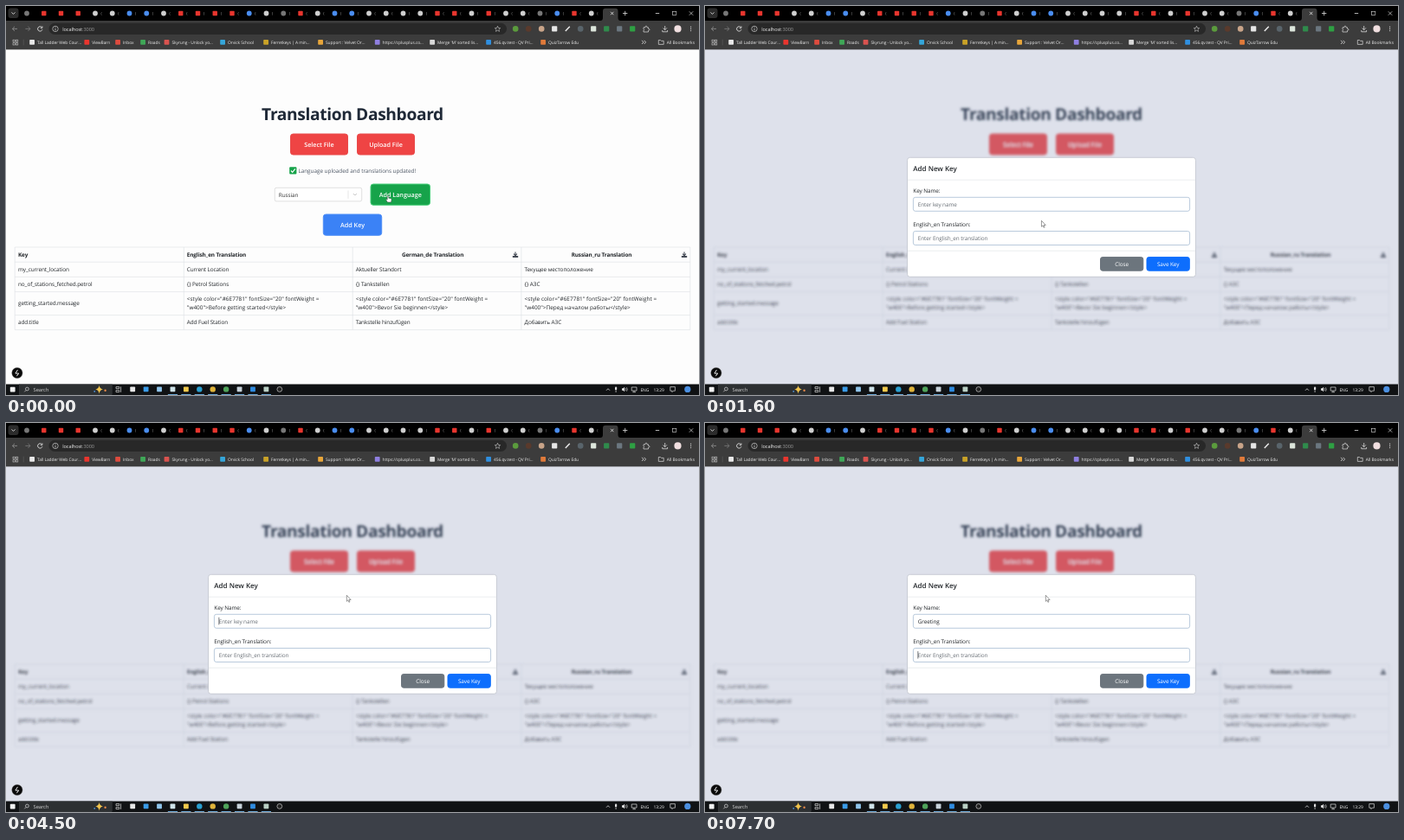
Animation of 800 by 450 pixels, one loop 8 s. Source, as an HTML page:

```html
<!DOCTYPE html>
<html lang="en">
<head>
<meta charset="utf-8">
<title>Translation Dashboard</title>
<style>
html, body { margin: 0; width: 100%; height: 100%; overflow: hidden; background: #fdfdfd; }
svg { display: block; width: 100vw; height: 100vh; }
text { font-family: "Open Sans", "Noto Sans", sans-serif; text-rendering: geometricPrecision; white-space: pre; }
</style>
</head>
<body>
<svg id="stage" viewBox="0 0 800 450">
  <defs>
    <filter id="soft" filterUnits="userSpaceOnUse" x="0" y="50" width="800" height="388">
      <feGaussianBlur id="blur" stdDeviation="0"/>
    </filter>
  </defs>
</svg>
<script>
const NS = 'http://www.w3.org/2000/svg';
const stage = document.getElementById('stage');
const blur = document.getElementById('blur');

function el(parent, tag, attrs = {}) {
  const node = document.createElementNS(NS, tag);
  for (const k in attrs) node.setAttribute(k, attrs[k]);
  return parent.appendChild(node);
}
const group = (parent = stage) => el(parent, 'g');
const rect = (p, x, y, width, height, fill, more) => el(p, 'rect', { x, y, width, height, fill, ...more });
const dot = (p, cx, cy, r, fill, more) => el(p, 'circle', { cx, cy, r, fill, ...more });
const line = (p, d, stroke, w = 0.7, more) =>
  el(p, 'path', { d, stroke, 'stroke-width': w, fill: 'none', ...more });
const tile = (p, cx, cy, size, fill) =>
  rect(p, cx - size / 2, cy - size / 2, size, size, fill, { rx: 0.8 });

// Sizes are nominal; the face is set a little smaller and tighter to suit the layout.
function text(p, x, y, str, o = {}) {
  const size = o.size || 6.67, weight = o.weight || 400;
  const track = o.track ?? ({ 400: -0.0125, 600: 0, 700: -0.018 })[weight];
  const node = el(p, 'text', {
    x, y, 'font-size': (size * 0.96).toFixed(2), 'font-weight': weight,
    'letter-spacing': (size * track).toFixed(3),
    fill: o.fill || '#212529', 'text-anchor': o.anchor || 'start'
  });
  node.textContent = str;
  return node;
}

function button(p, x, y, w, h, label, fill, o = {}) {
  const box = rect(p, x, y, w, h, fill, { rx: o.rx ?? 3, stroke: o.stroke || fill, 'stroke-width': 1 });
  text(p, x + w / 2, y + h / 2 + 2.7, label,
    { size: o.size || 7.5, weight: o.weight || 600, fill: '#fff', anchor: 'middle' });
  return box;
}

// Page
rect(stage, 0, 50, 800, 388, '#fdfdfd');
const page = group();
text(page, 400, 131.8, 'Translation Dashboard', { size: 20, weight: 700, fill: '#1f2937', anchor: 'middle' });
button(page, 328.5, 148, 66, 24, 'Select File', '#ef4444', { stroke: '#e94a4a' });
button(page, 405.5, 148, 66, 24, 'Upload File', '#ef4444', { stroke: '#e94a4a' });
rect(page, 327.2, 186.3, 8.2, 8.2, '#16a34a', { rx: 1 });
line(page, 'M329 190.5L330.7 192.3L333.8 188.4', '#fff', 1.1);
text(page, 337.4, 192.9, 'Language uploaded and translations updated!', { fill: '#4b5563', track: -0.005 });
rect(page, 310.3, 210.3, 100.4, 15.6, '#fff', { rx: 1.8, stroke: '#ccc', 'stroke-width': 0.6 });
text(page, 314.8, 220.6, 'Russian', { fill: '#333' });
line(page, 'M395 213.5V222.8', '#ccc', 0.5);
line(page, 'M400.8 217L402.8 219L404.8 217', '#bbb', 0.9);
const addLang = button(page, 421, 206, 68.5, 24.3, 'Add Language', '#22c55e', { stroke: '#45cf78' });
const addKey = button(page, 366.3, 241, 67.4, 24.3, 'Add Key', '#3b82f6', { stroke: '#4f8ff7' });

// Table
const rowLines = [279, 296.2, 313.4, 330.6, 357.6, 374.6];
const columns = [10.2, 205.3, 400.2, 594.9, 789.8];
for (const y of rowLines) line(page, `M10.2 ${y}H789.8`, '#dcdfe3', 0.6);
for (const x of columns) line(page, `M${x} 279V374.6`, '#dcdfe3', 0.6);

const head = { weight: 700 };
text(page, 14, 290.2, 'Key', head);
text(page, 208.8, 290.2, 'English_en Translation', head);
text(page, 492.6, 290.2, 'German_de Translation', { ...head, anchor: 'middle' });
text(page, 687.5, 290.2, 'Russian_ru Translation', { ...head, anchor: 'middle' });
for (const x of [588, 783]) {
  line(page, `M${x} 284.4V288M${x - 2} 286.7L${x} 288.8L${x + 2} 286.7`, '#444a55', 1.1);
  rect(page, x - 3.2, 289, 6.4, 2.1, '#444a55', { rx: 0.5 });
}
const cellText = [
  [307.1, 'my_current_location', 'Current Location', 'Aktueller Standort', 'Текущее местоположение'],
  [324.3, 'no_of_stations_fetched.petrol', '{} Petrol Stations', '{} Tankstellen', '{} АЗС'],
  [346.4, 'getting_started.message'],
  [368.4, 'add.title', 'Add Fuel Station', 'Tankstelle hinzufügen', 'Добавить АЗС']
];
const cellX = [14, 208.8, 403.7, 598.6];
for (const [y, ...cells] of cellText) cells.forEach((s, i) => text(page, cellX[i], y, s));
['Before getting started', 'Bevor Sie beginnen', 'Перед началом работы'].forEach((s, i) => {
  const x = cellX[i + 1];
  text(page, x, 341.4, '<style color="#6E7781" fontSize="20" fontWeight =', { track: 0.007 });
  text(page, x, 351.2, `"w400">${s}</style>`, { track: 0.005 });
});

// Backdrop and dialog
const modal = group();
rect(modal, 0, 50, 800, 388, 'rgb(130,145,180)', { opacity: 0.26 });
rect(modal, 233.6, 175.3, 332.8, 138, '#fff', { rx: 3, stroke: '#b9bec8', 'stroke-width': 0.7 });
line(modal, 'M234 201.2H566M234 283.2H566', '#dee2e6', 0.6);
text(modal, 240.3, 191.3, 'Add New Key', { size: 8.33, weight: 600 });
text(modal, 240.3, 215.5, 'Key Name:');
text(modal, 240.3, 254.7, 'English_en Translation:');
for (const y of [221.3, 260.5])
  rect(modal, 240.4, y, 319.2, 16, '#fff', { rx: 2.4, stroke: '#b2c5d8', 'stroke-width': 0.9 });
const keyField = text(modal, 245.8, 231.7, '');
text(modal, 245.8, 270.9, 'Enter English_en translation', { fill: '#676e75' });
const plain = { size: 6.67, weight: 400, rx: 2.4 };
button(modal, 456.5, 290.6, 49.3, 15.6, 'Close', '#6c757d', plain);
button(modal, 510, 290.6, 49.3, 15.6, 'Save Key', '#0d6efd', plain);
const caret = rect(modal, 0, 0, 0.6, 8.6, '#212529');

// Corner indicator
dot(stage, 12.9, 424.5, 6.2, '#0a0a0a', { stroke: '#8a8a8a', 'stroke-width': 0.4 });
line(stage, 'M13.5 420.9L10.9 425H14.7L12.3 428.2', '#fff', 0.9);

// Browser frame
const chrome = group();
const toolbar = '#3c3c3c';
rect(chrome, 0, 0, 800, 50.4, toolbar);
rect(chrome, 0, 0, 800, 17, '#000');
rect(chrome, 2.5, 2.5, 12, 11.5, '#2c2c2c', { rx: 3 });
line(chrome, 'M6.5 7.4L8.5 9.4L10.5 7.4', '#ddd', 0.9);
const hues = { r: '#e8352e', w: '#cfcfcf', b: '#4a8df0', d: '#777' };
[...'drrrwwbbwrrrrbwdrwbbwwwwrrwrwwdbrw'].forEach((c, i) => {
  const x = 24 + 19.75 * i;
  if (c === 'r') tile(chrome, x, 8.5, 5.4, hues.r);
  else dot(chrome, x, 8.5, 2.9, hues[c]);
  if (i > 3) text(chrome, x + 6.4, 10, '(', { size: 4.4, fill: '#aaa' });
});
el(chrome, 'path', { d: 'M686 17Q689 17 689 13.5V6Q689 2.8 692 2.8H703.5Q706.5 2.8 706.5 6V13.5Q706.5 17 709.5 17Z', fill: toolbar });
line(chrome, 'M698 6.8L701.4 10.2M701.4 6.8L698 10.2', '#eee', 0.8);
line(chrome, 'M712 8.5H717.4M714.7 5.8V11.2M749.8 8.5H754.2', '#ddd', 0.8);
rect(chrome, 769.6, 6.3, 4.2, 4.2, 'none', { stroke: '#ddd', 'stroke-width': 0.6 });
line(chrome, 'M788.8 6.3L793.2 10.7M793.2 6.3L788.8 10.7', '#ddd', 0.7);

rect(chrome, 49.5, 19.8, 528.5, 13.2, '#282828', { rx: 6.6 });
line(chrome, 'M13 26.4H7.4M10 23.8L7.4 26.4L10 29', '#8a8a8a', 0.9);
line(chrome, 'M22.4 26.4H28M25.4 23.8L28 26.4L25.4 29', '#777', 0.9);
line(chrome, 'M41.3 24.6A2.7 2.7 0 1 0 41.9 27.2M41.9 23.4V25.4H39.8', '#ddd', 0.9);
dot(chrome, 57, 26.4, 3.2, 'none', { stroke: '#ccc', 'stroke-width': 0.7 });
line(chrome, 'M57 25.8V28.3M57 24.4V25.1', '#ccc', 0.8);
const address = text(chrome, 65.2, 28.5, 'localhost', { size: 5.83, fill: '#f0f0f0' });
const port = el(address, 'tspan', { fill: '#999' });
port.textContent = ':3000';
line(chrome, 'M567.5 23.2L568.4 25.4L570.7 25.6L569 27.2L569.5 29.4L567.5 28.2L565.5 29.4L566 27.2L564.3 25.6L566.6 25.4Z', '#ccc', 0.6);
['#5b9b3d', '#5a3a2c', '#c9a489', '#e6e6e6', '', '#59646b', '#dde6dc', '#2f8b4c', '#6b7780', '#2ea043']
  .forEach((c, i) => {
    const x = 588.2 + 15 * i;
    if (!c) line(chrome, `M${x - 2.4} 29L${x + 2.6} 23.8`, '#e8e8e8', 1.5);
    else if (i === 3 || i > 5) tile(chrome, x, 26.4, 6.2, c);
    else dot(chrome, x, 26.4, 3.3, c);
  });
line(chrome, 'M736 24.8H738Q738 23 739 23Q740 23 740 24.8H741.5V26.3Q743 26.3 743 27.3Q743 28.3 741.5 28.3V30H736V28Q737.4 27.3 736 26.6Z', '#ddd', 0.7);
line(chrome, 'M760.7 23V27.5M758.6 25.6L760.7 27.7L762.8 25.6M757.8 28V29.8H763.6V28', '#ddd', 0.8);
dot(chrome, 775.5, 26.4, 4.1, '#f1dfe0');
for (const y of [24.2, 26.4, 28.6]) dot(chrome, 790.6, y, 0.6, '#ddd');

for (const dx of [0, 3.6]) for (const dy of [0, 3.6])
  rect(chrome, 8 + dx, 39.2 + dy, 2.2, 2.2, 'none', { stroke: '#ccc', 'stroke-width': 0.6 });
line(chrome, 'M20.2 38.5V45.5', '#666', 0.5);
const bookmarks = [
  [36, 'Tall Ladder Web Cour...', '#e8e8e8'],
  [99.2, 'ViewBarn', '#e8352e'],
  [135, 'Inbox', '#dd4b3e'],
  [164, 'Roads', '#3fa757'],
  [191.4, 'Skyrung - Unlock yo...', '#d9534f'],
  [256, 'Orvick School', '#35a5d9'],
  [306, 'Ferretkeys | A min...', '#c9a227'],
  [369, 'Support : Velvet Or...', '#e8a63a'],
  [434.6, 'https://cplusplus.co...', '#8f7fe0'],
  [498, "Merge 'M' sorted lis...", '#d8d8d8'],
  [563, '456.qv.test - QV Pri...', '#2f8fe0'],
  [626, 'QuizTarrow Edu', '#e07a3a']
];
for (const [x, label, fill] of bookmarks) {
  tile(chrome, x - 5.9, 41.9, 5.8, fill);
  text(chrome, x, 43.7, label, { size: 5.1, fill: '#ececec' });
}
line(chrome, 'M734 39.8L736 41.9L734 44M736.6 39.8L738.6 41.9L736.6 44', '#ddd', 0.8);
line(chrome, 'M753.3 39.5H755.6L756.4 40.4H759.2V44.4H753.3Z', '#ddd', 0.7);
text(chrome, 762.8, 43.7, 'All Bookmarks', { size: 5.15, fill: '#ececec' });

// Taskbar
const bar = group();
rect(bar, 0, 437.5, 800, 12.5, '#101214');
tile(bar, 7.7, 443.6, 5.8, '#f2f2f2');
rect(bar, 15.2, 437.8, 107, 12, '#2d3032', { stroke: '#45484a', 'stroke-width': 0.4 });
dot(bar, 24.4, 443, 1.9, 'none', { stroke: '#ddd', 'stroke-width': 0.7 });
line(bar, 'M23 444.5L21.3 446.3', '#ddd', 0.7);
text(bar, 31.6, 445.8, 'Search', { size: 6, fill: '#d4d4d4' });
el(bar, 'path', { d: 'M107.6 438.8Q108.3 443 112 443.6Q108.3 444.2 107.6 448.4Q106.9 444.2 103.2 443.6Q106.9 443 107.6 438.8Z', fill: '#f1c44c' });
dot(bar, 114.6, 444.8, 1.2, '#e8894a');
dot(bar, 102.2, 445.8, 0.9, '#4f9be8');
line(bar, 'M127 440.6H130.8V442.6H127ZM127 444.6H130.8V446.6H127ZM132.6 440.4V446.8', '#ddd', 0.7);
['#e8e8e8', '#3a9be8', '#8fc4ea', '#cfe3ea', '#f2c94c', '#2a9fd0', '#e0b43a', '#4fa35a', '#c7d2da', '#2f8be0', '#b9cfc4', '']
  .forEach((c, i) => {
    const x = 146.2 + 15.42 * i;
    if (!c) dot(bar, x, 443.4, 2.9, '#222', { stroke: '#ccc', 'stroke-width': 0.7 });
    else if (i > 4 && i < 8) dot(bar, x, 443.4, 3.2, c);
    else tile(bar, x, 443.4, 5.8, c);
    if (i > 2 && i < 11) rect(bar, x - 5.6, 449.1, 11.2, 0.9, '#76b9ed');
  });
line(bar, 'M693 444.7L695 442.7L697 444.7', '#ddd', 0.8);
rect(bar, 703, 440.4, 2.2, 4.2, '#ddd', { rx: 1.1 });
line(bar, 'M704.1 445V447', '#ddd', 0.7);
el(bar, 'path', { d: 'M711 442.3H712.4L714.2 440.7V446.3L712.4 444.7H711Z', fill: '#ddd' });
line(bar, 'M715.4 442.2Q716.4 443.5 715.4 444.8M716.5 441.2Q718.2 443.5 716.5 445.8', '#ddd', 0.6);
line(bar, 'M722.2 441H728V445H722.2ZM725 445V446.5M723.4 446.7H727', '#ddd', 0.7);
text(bar, 732.4, 445.5, 'ENG', { size: 5.2, fill: '#eee' });
text(bar, 747.4, 445.5, '13:29', { size: 5.2, fill: '#eee' });
line(bar, 'M766.8 440.6H772.4V445.2H770.2L769 446.6V445.2H766.8Z', '#ddd', 0.7);
dot(bar, 786.8, 443.4, 3.6, '#4b8fe0');

// Pointer
const pointer = group();
const ink = { stroke: '#4a4a4a', 'stroke-width': 0.55, 'stroke-linejoin': 'round', fill: '#fff' };
const shapes = {
  arrow: el(pointer, 'path', { d: 'M0 0V7L1.5 5.6L2.6 8L3.7 7.5L2.6 5.2H4.8Z', ...ink }),
  hand: el(pointer, 'path', { d: 'M-.8 .8Q0 -.6 .8 .8V3.2L3.4 3.8Q4.2 4 4.1 5L3.6 8H-.6L-2.4 5Q-2.2 4 -.8 5Z', ...ink }),
  beam: el(pointer, 'path', { d: 'M-1.2 -3.2H1.2M0 -3.2V3.2M-1.2 3.2H1.2', stroke: '#333', 'stroke-width': 0.6, fill: 'none' })
};

const LOOP = 8000;
const part = (t, a, b) => Math.min(1, Math.max(0, (t - a) / (b - a)));
const ease = k => k * k * (3 - 2 * k);
const mix = (a, b, k) => a.map((v, i) => v + (b[i] - v) * k);
const rgb = c => `rgb(${c.map(Math.round)})`;

// [start, end, x, y]: travel to x, y between the two times
const moves = [[200, 900, 411, 254], [1400, 2000, 324, 232], [2500, 2700, 393.3, 199.3]];
function pointerAt(t) {
  let at = [441, 219];
  for (const [a, b, x, y] of moves) at = mix(at, [x, y], ease(part(t, a, b)));
  return at;
}

const typed = [[4600, 1], [4800, 2], [4900, 3], [5000, 4], [5600, 5], [5800, 7], [6000, 8]];
const caretOn = [[2400, 2900], [3500, 4000], [4500, 5500], [5600, 6500], [6600, 7100], [7700, 8000]];

function draw(time) {
  const t = Math.floor(time % LOOP / 100) * 100;
  const open = t >= 1400;

  const leave = part(t, 450, 750), enter = part(t, 550, 850);
  addLang.setAttribute('fill', rgb(mix([22, 163, 74], [34, 197, 94], leave)));
  addKey.setAttribute('fill', rgb(mix([59, 130, 246], [37, 99, 235], enter)));

  modal.style.display = open ? '' : 'none';
  const haze = 1.4 * part(t, 1400, 1600);
  blur.setAttribute('stdDeviation', haze);
  if (haze) page.setAttribute('filter', 'url(#soft)');
  else page.removeAttribute('filter');

  const count = typed.reduce((n, [at, len]) => t >= at ? len : n, 0);
  keyField.textContent = count ? 'Greeting'.slice(0, count) : 'Enter key name';
  keyField.setAttribute('fill', count ? '#212529' : '#676e75');

  caret.style.display = caretOn.some(([a, b]) => t >= a && t < b) ? '' : 'none';
  const second = t >= 6600;
  const shift = count && !second ? keyField.getComputedTextLength() : 0;
  caret.setAttribute('x', 245.6 + shift);
  caret.setAttribute('y', second ? 264 : 224.8);

  const [x, y] = pointerAt(t);
  const onButton = y < 230 || y > 241;
  const kind = open ? (y > 221 && y < 238 ? 'beam' : 'arrow') : onButton ? 'hand' : 'arrow';
  for (const k in shapes) shapes[k].style.display = k === kind ? '' : 'none';
  pointer.setAttribute('transform', `translate(${x.toFixed(2)} ${y.toFixed(2)})`);
}

const start = performance.now();
(function tick() {
  draw(performance.now() - start);
  requestAnimationFrame(tick);
})();
</script>
</body>
</html>
```
